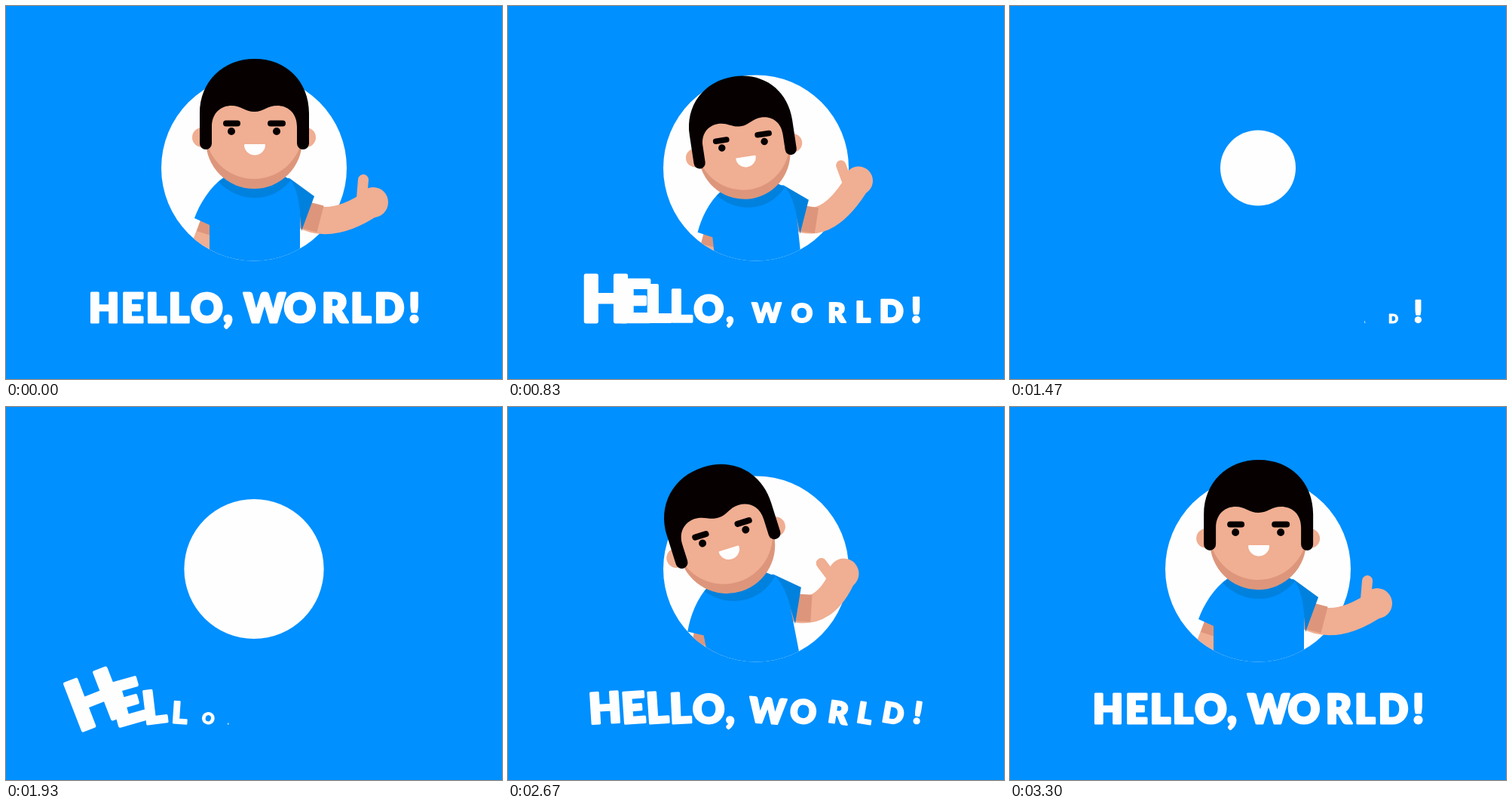
An HTML page with a canvas for the animation above (3.33 s loop, 658 by 494 pixels).

```html
<!DOCTYPE html>
<html lang="en">
<head>
<meta charset="utf-8">
<title>Hello, World!</title>
<style>
  html, body { margin: 0; overflow: hidden; background: #0090ff; }
  canvas { display: block; }
</style>
</head>
<body>
<canvas width="658" height="494"></canvas>
<script>
const ctx = document.querySelector('canvas').getContext('2d');
const LOOP = 3330, RAD = Math.PI / 180;
const BLUE = '#0090ff', SHADE = '#0081de', WHITE = '#fefefe';
const SKIN = '#f0ae92', TAN = '#dd967b', BLACK = '#060000';

// Smooth curve through time, value pairs; flat at the ends and turning points.
function track(...flat) {
  const k = [];
  for (let i = 0; i < flat.length; i += 2) k.push([flat[i], flat[i + 1]]);
  const slope = i => {
    if (!i || i === k.length - 1) return 0;
    const [a, b, c] = [k[i - 1], k[i], k[i + 1]];
    return (b[1] - a[1]) * (c[1] - b[1]) <= 0 ? 0 : (c[1] - a[1]) / (c[0] - a[0]);
  };
  return t => {
    if (t <= k[0][0]) return k[0][1];
    const i = k.findIndex(p => p[0] >= t);
    if (i < 0) return k[k.length - 1][1];
    const [t0, v0] = k[i - 1], [t1, v1] = k[i];
    const d = t1 - t0, p = (t - t0) / d, q = 1 - p;
    return v0 * (1 + 2 * p) * q * q + slope(i - 1) * d * p * q * q
         + v1 * p * p * (3 - 2 * p) - slope(i) * d * p * p * q;
  };
}

const baseX = track(0, 330, 830, 334, 1170, 342, 1500, 350, 1900, 338, 2230, 338, 2670, 330);
const baseY = track(400, 350, 830, 357, 1170, 404, 1450, 560, 1900, 590, 2230, 365, 2450, 350);
const size = track(400, 1, 830, .95, 1170, .88, 1500, .8, 1900, .8, 2230, .93, 2500, 1);
const lean = track(0, 0, 830, -6, 1170, -8, 1500, -10, 1900, 8, 2230, 1, 2670, -11, 3050, 1, LOOP, 0);
const nod = track(0, 0, 830, -2.6, 1170, -10.8, 1500, -14, 1900, 16, 2230, 12.5, 2670, -6.5, 3050, 1, LOOP, 0);
const armTurn = track(830, 0, 1170, -24, 1500, -24, 1900, 40, 2230, 36, 2600, 0);
const handX = track(0, 487, 830, 481, 1500, 481, 1900, 487, 2230, 487, 2670, 468, 3200, 487);
const handY = track(0, 260, 830, 233, 1500, 233, 1900, 260, 2230, 260, 2670, 245, 3200, 260);
const handTurn = track(0, 0, 830, -19, 1500, -19, 1900, 0, 2230, 0, 2670, -31, 3200, 0);
const openTop = track(830, 306, 1100, 100, 1900, 100, 2230, 306);

const letterSize = track(315, 1, 565, .67, 928, 1.82, 1152, 0, 1700, 0, 1962, 1.8, 2290, .72, 2620, 1.08, 2850, 1);
const letterTurn = track(1200, 0, 1600, 25, 1700, 25, 1950, -22, 2300, 10, 2620, -4, 2850, 0);
const letterX = [130, 168, 199.5, 229.5, 266.5, 294.5, 343, 390, 436, 471, 508.5, 541.5];

function fill(color, d) {
  ctx.fillStyle = color;
  ctx.fill(new Path2D(d));
}
function stroke(color, width, d, cap = 'round') {
  ctx.strokeStyle = color;
  ctx.lineWidth = width;
  ctx.lineCap = cap;
  ctx.stroke(new Path2D(d));
}
function dot(color, x, y, r) {
  ctx.fillStyle = color;
  ctx.beginPath();
  ctx.arc(x, y, r, 0, 7);
  ctx.fill();
}
// Draws inside a saved state, turned by deg about x, y.
function turned(x, y, deg, draw) {
  ctx.save();
  ctx.translate(x, y);
  ctx.rotate(deg * RAD);
  ctx.translate(-x, -y);
  draw();
  ctx.restore();
}

function drawArm(t) {
  const x = handX(t), y = handY(t);
  stroke(SKIN, 36, `M392 276Q432 298 ${x} ${y}`);
  stroke(TAN, 36, 'M390 275L417 282', 'butt');
  turned(x, y, handTurn(t), () => {
    dot(SKIN, x, y, 20);
    stroke(SKIN, 14, `M${x - 13} ${y - 30}L${x - 15} ${y - 6}`);
  });
  fill(SHADE, 'M376 228L409 252L392 298C390 275 388 250 376 228Z');
}

function drawHead() {
  dot(SKIN, 260, 174, 13);
  dot(SKIN, 398, 174, 13);
  const face = new Path2D('M265 120H393V178A64 64 0 0 1 265 178Z');
  ctx.fillStyle = TAN;
  ctx.fill(face);
  ctx.save();
  ctx.clip(face);
  dot(SKIN, 329, 164, 65);
  ctx.restore();
  fill(BLACK, 'M257 182V142C257 100 288 70 330 70S402 100 402 142V182a8 8 0 0 1-16 0V160' +
    'C386 140 372 132 360 132C346 132 342 140 329.5 140S312 132 299 132' +
    'C287 132 273 140 273 160V182a8 8 0 0 1-16 0Z');
  stroke(BLACK, 8, 'M292 155.5H307M351 155.5H367');
  dot(BLACK, 299, 166, 5);
  dot(BLACK, 359, 166, 5);
  fill(WHITE, 'M317 183H343Q344 183 344 184A14 13.5 0 0 1 316 184Q316 183 317 183Z');
}

function drawPerson(t) {
  ctx.save();
  ctx.translate(baseX(t), baseY(t));
  ctx.rotate(lean(t) * RAD);
  ctx.scale(size(t), size(t));
  ctx.translate(-330, -350);
  fill(SKIN, 'M258 284L236 340H280V288Z');
  fill(TAN, 'M258 284L253 298L272 304V288Z');
  turned(372, 240, armTurn(t), () => drawArm(t));
  fill(BLUE, 'M290 226C270 240 257 262 250 281L270 290V440H390V275C389 255 384 238 376 228Z');
  fill(SHADE, 'M282 233C296 247 312 254 330 254S364 247 378 231L330 200Z');
  turned(330, 232, nod(t), drawHead);
  ctx.restore();
}

function drawText(t) {
  ctx.font = '900 52px Lato, sans-serif';
  ctx.textAlign = 'center';
  ctx.fillStyle = ctx.strokeStyle = WHITE;
  ctx.lineWidth = 3;
  ctx.lineJoin = 'round';
  [...'HELLO,WORLD!'].forEach((c, i) => {
    const s = t - 38 * i, k = letterSize(s);
    if (k < .02) return;
    turned(letterX[i], 420, letterTurn(s), () => {
      ctx.translate(letterX[i], 420);
      ctx.scale(k, k);
      ctx.fillText(c, 0, -1.5);
      ctx.strokeText(c, 0, -1.5);
    });
  });
}

function radius(t) {
  const p = t < 1635 ? (t - 950) / 620 : 1 - (t - 1700) / 620;
  return 123 * (1 - Math.min(1, Math.max(0, p)) ** 3);
}

function frame(now) {
  const t = now % LOOP, r = radius(t);
  ctx.fillStyle = BLUE;
  ctx.fillRect(0, 0, 658, 494);
  dot(WHITE, 329, 214.5, r);
  // The person may leave the disc only above openTop.
  const mask = new Path2D();
  mask.rect(0, 0, 658, openTop(t));
  mask.moveTo(329 + r, 214.5);
  mask.arc(329, 214.5, r, 0, 2 * Math.PI);
  ctx.save();
  ctx.clip(mask);
  drawPerson(t);
  ctx.restore();
  drawText(t);
  requestAnimationFrame(frame);
}
requestAnimationFrame(frame);
</script>
</body>
</html>
```
